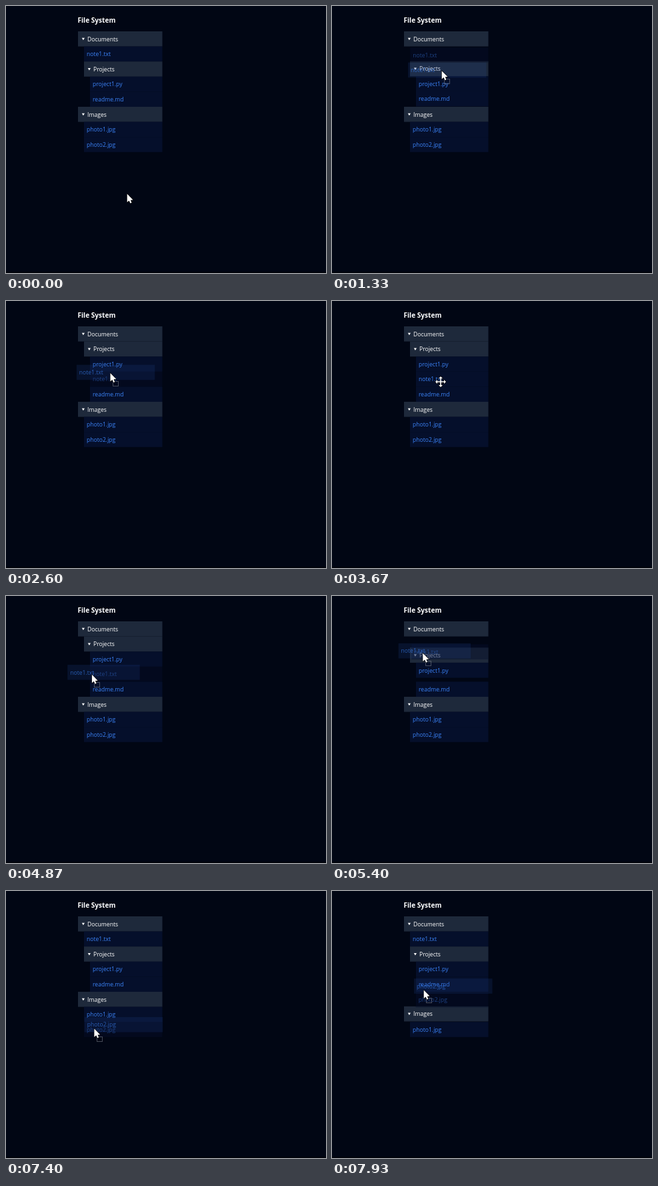
These frames come from a looping animation (480 by 400 pixels, 8 s). An HTML page with a canvas:

```html
<!DOCTYPE html>
<html lang="en">
<head>
<meta charset="utf-8">
<title>File tree drag and drop</title>
<style>
  html, body { margin: 0; width: 100%; height: 100%; overflow: hidden; background: #010614; }
  canvas { display: block; }
</style>
</head>
<body>
<canvas id="stage" width="480" height="400"></canvas>
<script>
const ctx = document.getElementById('stage').getContext('2d');
const LOOP = 8000, STEP = 200 / 3, SHIFT_MS = 150;
const LEFT = 108, RIGHT = 234.5, TOP = 38, ROW = 22.6, INDENT = 9;
const BLUE = '#3b82f6';
const FONT = '"Open Sans", "Noto Sans", sans-serif';

// Top to bottom, two spaces per level.
const tree = [
  'Documents', '  note1.txt', '  Projects', '    project1.py', '    readme.md',
  'Images', '  photo1.jpg', '  photo2.jpg'
].map(line => ({ name: line.trim(), depth: line.search(/\S/) / 2 }));

// While a row is dragged, it is put behind another row at a new depth.
const moves = [
  { at: 1320, name: 'note1.txt', behind: 'readme.md', depth: 2 },
  { at: 2060, name: 'note1.txt', behind: 'project1.py', depth: 2 },
  { at: 5300, name: 'note1.txt', behind: 'Documents', depth: 1 },
  { at: 7530, name: 'photo2.jpg', behind: 'Images', depth: 1 },
  { at: 7800, name: 'photo2.jpg', behind: 'readme.md', depth: 2 }
];

const drags = [
  { from: 930, to: 3270, name: 'note1.txt' },
  { from: 3930, to: 6000, name: 'note1.txt' },
  { from: 7260, to: LOOP, name: 'photo2.jpg' }
];

// The pointer glides to each place and rests there until the next glide.
const home = { x: 182, y: 282 };
const glides = [
  { from: 70, to: 870, x: 168, y: 73.5 },
  { from: 930, to: 1730, x: 162, y: 121 },
  { from: 1870, to: 2270, x: 157, y: 107 },
  { from: 2470, to: 3130, x: 155, y: 122 },
  { from: 3600, to: 3660, x: 163, y: 121 },
  { from: 3930, to: 4730, x: 129, y: 119 },
  { from: 4800, to: 5600, x: 138, y: 80 },
  { from: 5670, to: 6070, x: 137, y: 75.5 },
  { from: 6670, to: 6800, x: 132, y: 214 },
  { from: 7260, to: 7930, x: 138, y: 149 }
];

const mix = (a, b, p) => a + (b - a) * p;
const smooth = p => { p = Math.max(0, Math.min(1, p)); return p * p * (3 - 2 * p); };
const glide = (a, b, p) => ({ x: mix(a.x, b.x, p), y: mix(a.y, b.y, p) });

const pointerAt = t => glides.reduce(
  (place, g) => glide(place, g, smooth((t - g.from) / (g.to - g.from))), home);

function reorder(rows, { name, behind, depth }) {
  const rest = rows.filter(row => row.name !== name);
  rest.splice(rest.findIndex(row => row.name === behind) + 1, 0, { name, depth });
  return rest;
}

function placeOf(rows, name) {
  const i = rows.findIndex(row => row.name === name);
  return { x: LEFT + rows[i].depth * INDENT, y: TOP + i * ROW };
}

function rowsAt(t) {
  let before = tree, now = tree, p = 1;
  for (const move of moves.filter(m => m.at <= t)) {
    before = now;
    now = reorder(now, move);
    p = smooth((t - move.at) / SHIFT_MS);
  }
  return tree.map(({ name }) =>
    ({ name, ...glide(placeOf(before, name), placeOf(now, name), p) }));
}

function text(label, x, y, color, font = '500 8.6px ') {
  ctx.font = font + FONT;
  ctx.fillStyle = color;
  ctx.fillText(label, x, y);
}

function polygon(points) {
  ctx.beginPath();
  points.forEach(([x, y]) => ctx.lineTo(x, y));
  ctx.closePath();
}

function drawRow({ name, x, y }, alpha = 1) {
  const folder = !name.includes('.');
  ctx.globalAlpha = alpha;
  ctx.fillStyle = folder ? '#1e293b' : '#050f2b';
  ctx.fillRect(x, y, RIGHT - x, ROW);
  if (folder) {
    polygon([[x + 5.8, y + 9.8], [x + 10, y + 9.8], [x + 7.9, y + 13.3]]);
    ctx.fillStyle = '#fff';
    ctx.fill();
  }
  text(name, x + (folder ? 14 : 4), y + 14.6, folder ? '#fff' : BLUE);
  ctx.globalAlpha = 1;
}

function drawGhost({ from, name }, pointer) {
  const origin = rowsAt(from).find(row => row.name === name);
  const grab = pointerAt(from);
  const x = origin.x + pointer.x - grab.x, y = origin.y + pointer.y - grab.y;
  ctx.fillStyle = 'rgba(30, 64, 140, 0.2)';
  ctx.fillRect(x, y, RIGHT - origin.x, ROW);
  ctx.globalAlpha = 0.65;
  text(name, x + 4, y + 14.6, BLUE);
  ctx.globalAlpha = 1;
}

function paintCursor({ x, y }, points) {
  polygon(points.map(([px, py]) => [x + px, y + py]));
  ctx.lineJoin = 'round';
  ctx.lineWidth = 1.2;
  ctx.strokeStyle = '#000';
  ctx.stroke();
  ctx.fillStyle = '#fff';
  ctx.fill();
}

function drawArrow(pointer) {
  paintCursor(pointer,
    [[-0.3, -0.4], [-0.3, 12], [2.6, 9.5], [4.4, 13.6], [6.5, 12.7], [4.8, 8.8], [8.5, 8.5]]);
}

function drawMoveCursor(pointer) {
  const arm = [[-0.8, -0.8], [-0.8, -5], [-3, -5], [0, -8], [3, -5], [0.8, -5]];
  const turn = points => points.map(([x, y]) => [-y, x]);
  const right = turn(arm), down = turn(right), left = turn(down);
  paintCursor(pointer, [...arm, ...right, ...down, ...left]);
}

function drawBadge({ x, y }) {
  ctx.strokeStyle = '#8a8f98';
  ctx.lineWidth = 1;
  ctx.setLineDash([1, 1]);
  ctx.strokeRect(Math.round(x + 3) + 0.5, Math.round(y + 11) + 0.5, 8, 7);
  ctx.setLineDash([]);
}

function draw(t) {
  const pointer = pointerAt(t);
  const drag = drags.find(d => t >= d.from && t < d.to);
  ctx.fillStyle = '#010614';
  ctx.fillRect(0, 0, 480, 400);
  ctx.fillStyle = '#01030b';
  ctx.fillRect(0, 398, 480, 2);
  text('File System', 107.5, 24.6, '#fff', 'bold 10.1px ');

  const rows = rowsAt(t);
  const held = rows.find(row => row.name === drag?.name);
  rows.filter(row => row !== held).forEach(row => drawRow(row));
  if (held) drawRow(held, 0.45);

  if (drag) {
    drawGhost(drag, pointer);
    drawBadge(pointer);
    drawArrow(pointer);
  } else if (pointer.y < TOP + tree.length * ROW) {
    drawMoveCursor(pointer);
  } else {
    drawArrow(pointer);
  }
}

// Motion advances 15 times a second, like a screen recording.
function tick() {
  const t = performance.now() % LOOP;
  draw(Math.floor((t + 5) / STEP) * STEP % LOOP);
  requestAnimationFrame(tick);
}
tick();
</script>
</body>
</html>
```
